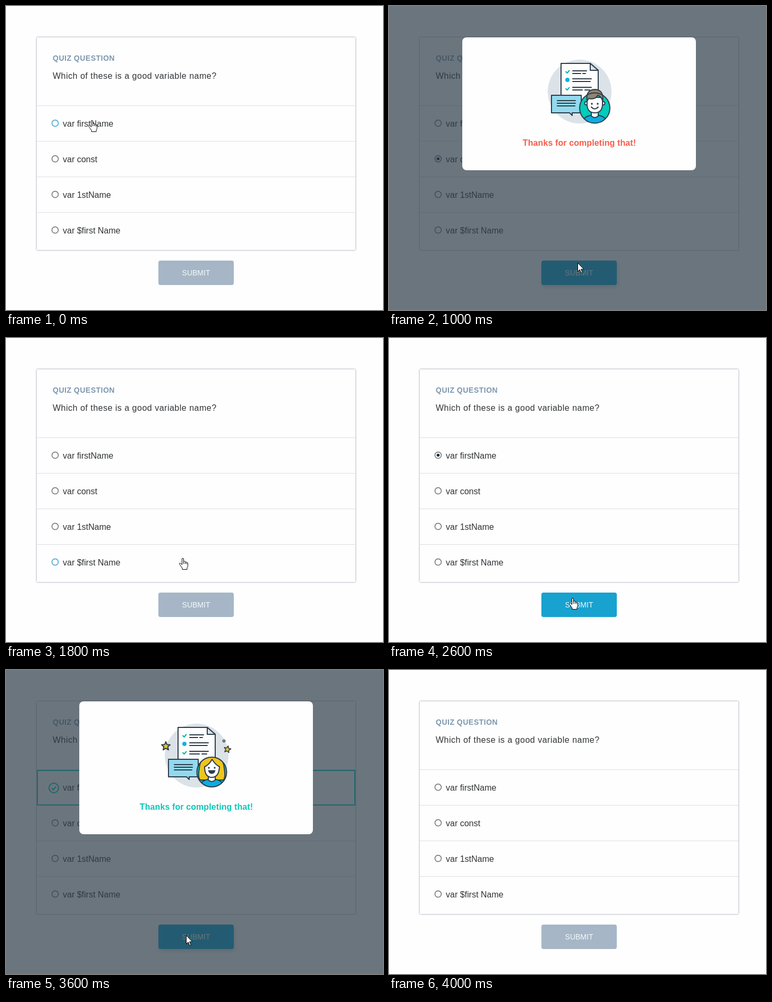
An HTML page that plays this animation: 710 px wide and 572 px high, repeating every 5 s.

```html
<!DOCTYPE html>
<html lang="en">
<head>
<meta charset="utf-8">
<title>Quiz</title>
<style>
  html, body { margin: 0; width: 100%; height: 100%; overflow: hidden; background: #fefefe; }
  svg { display: block; }
  text { font: 16px "Liberation Sans", Arial, sans-serif; fill: #303336; }
  .bold { font-weight: bold; }
  .kicker { font-weight: bold; font-size: 14px; letter-spacing: .5px; fill: #7d97ad; }
  .question { letter-spacing: .5px; }
  .submit { font-size: 14px; fill: #f6fafc; text-anchor: middle; }
  .thanks { font-weight: bold; letter-spacing: .1px; text-anchor: middle; }
  .ring { fill: #fefefe; stroke-width: 1.5; }
  .ink { stroke: #2e3d49; stroke-width: 2; stroke-linejoin: round; stroke-linecap: round; }
  .none { fill: none; }
  .card { filter: drop-shadow(0 0 1.5px rgba(52, 62, 96, .65)); }
</style>
</head>
<body>
<svg width="710" height="572" viewBox="0 0 710 572">
  <defs>
    <clipPath id="disc"><circle cx="387.5" cy="192" r="28"/></clipPath>
    <path id="star" d="M0-8 2.2-2.7 8-2.3 3.6 1.5 5 7.3 0 4.2-5 7.3-3.6 1.5-8-2.3-2.2-2.7Z"/>
  </defs>

  <rect width="710" height="572" fill="#fefefe"/>
  <rect class="card" x="58" y="59" width="600" height="400" fill="#fefefe"/>
  <text class="kicker" x="88" y="103">QUIZ QUESTION</text>
  <text class="question" x="88" y="137">Which of these is a good variable name?</text>
  <g id="rows"></g>

  <g id="right" fill="none" stroke="#02ccba" stroke-width="2">
    <rect x="59" y="189" width="598" height="65"/>
    <circle cx="90" cy="222" r="9" fill="#fefefe"/>
    <path d="M86 222.5l3 3 5-6"/>
  </g>

  <rect id="shade" x="287" y="479" width="142" height="46" rx="4" fill="#2e3d49"/>
  <rect id="button" x="287" y="479" width="142" height="46" rx="4"/>
  <text class="submit" x="358" y="507">SUBMIT</text>

  <g id="modal">
    <rect width="710" height="572" fill="#2e3d49" opacity=".7"/>
    <rect x="138" y="59" width="440" height="250" rx="8" fill="#fefefe"/>
    <circle cx="359" cy="161" r="60" fill="#dbe2e8"/>
    <path class="ink" fill="#fefefe" d="M324 108H379L394 121V190H324Z"/>
    <path class="ink" fill="#dbe2e8" d="M379 108V121H394Z"/>
    <path class="ink none" d="M346 122H372M346 127H361M365 127H370M346 137H381M346 142H379M346 153H381M346 158H364M369 158H378"/>
    <path fill="none" stroke="#02b3a4" stroke-width="2" d="M332.500 123l3 3 4.500-5M332.500 155l3 3 4.500-5"/>
    <circle cx="336" cy="139" r="4" fill="#12b2dc"/>
    <path class="ink" fill="#92d9f0" d="M306 168H362V201H345V206L340 201H306Z"/>
    <path class="ink none" d="M317 178H351M317 183H351M317 188H350"/>

    <g id="boy">
      <circle cx="387.500" cy="192" r="28.500" fill="#02ccba"/>
      <g clip-path="url(#disc)">
        <ellipse class="ink" cx="387.500" cy="218" rx="23" ry="13" fill="#0aaee0"/>
        <path class="ink" fill="#fefefe" d="M381 198V207Q387.500 213 394 207V198Z"/>
      </g>
      <circle class="ink" cx="371.500" cy="183" r="3" fill="#fefefe"/>
      <circle class="ink" cx="403.500" cy="183" r="3" fill="#fefefe"/>
      <path class="ink" fill="#fefefe" d="M373 172V186Q374 201 387.500 201T402 186V172Z"/>
      <path class="ink" fill="#918570" d="M373 179Q370 158 387 157Q405 157 402.500 179Q400 170 393 168Q388 177 376 174Z"/>
      <circle class="ink none" cx="387.500" cy="192" r="28.500"/>
      <circle cx="382" cy="184" r="1.800" fill="#2e3d49"/>
      <circle cx="393" cy="184" r="1.800" fill="#2e3d49"/>
      <path class="ink none" d="M381 190Q387.500 197 394 190"/>
    </g>

    <g id="girl">
      <circle cx="387.500" cy="192" r="28" fill="#02ccba"/>
      <g clip-path="url(#disc)">
        <path class="ink" fill="#efc51c" d="M366 207Q361 203 364 185Q366 161 387.500 161T411 185Q414 203 409 207Z"/>
        <ellipse class="ink" cx="387.500" cy="218" rx="22" ry="13" fill="#0aaee0"/>
        <path class="ink" fill="#fefefe" d="M381 198V207Q387.500 213 394 207V198Z"/>
      </g>
      <path class="ink" fill="#fefefe" d="M374 182Q374 202 387.500 202T402 182Q394 178 388 168Q383 178 374 182Z"/>
      <circle class="ink none" cx="387.500" cy="192" r="28"/>
      <circle cx="382" cy="184" r="1.700" fill="#2e3d49"/>
      <circle cx="393" cy="184" r="1.700" fill="#2e3d49"/>
      <path fill="#2e3d49" d="M380.500 188.500H394.500Q393 195.500 387.500 195.500T380.500 188.500Z"/>
      <g class="ink" fill="#efc51c">
        <use href="#star" x="301" y="143"/>
        <use href="#star" transform="translate(417 149) rotate(12) scale(.8)"/>
      </g>
      <circle cx="410.500" cy="133.500" r="2" fill="none" stroke="#2e3d49" stroke-width="1.500"/>
    </g>
    <text class="thanks" id="thanks" x="358.500" y="263">Thanks for completing that!</text>
  </g>

  <g id="hand" fill="#fff" stroke="#000" stroke-linejoin="round">
    <path d="M5.500 12.500V2Q5.500.5 7 .5T8.500 2V6.800Q9.300 5.500 10.800 6.200 11.500 6.600 11.500 7.400 12.600 6.600 13.600 7.300 14.200 7.800 14.200 8.600 16.500 8.200 16.500 10.500V14.500Q16.500 16 15 18.500V21.500H6V19Q4.500 17 3 14.800 1.500 12.500.6 11.200.3 9.700 1.600 9.500 3 9.500 5.500 12.500Z"/>
    <path fill="none" d="M8.500 6.500V11M11.500 7.400V11M14.200 8.600V11.500"/>
  </g>
  <path id="arrow" fill="#fff" stroke="#000" d="M.5.5V16.500L4.200 13 6.800 19.500 9.200 18.500 6.600 12.200H11.800Z"/>
</svg>

<script>
const LOOP = 5000;
const $ = id => document.getElementById(id);
const show = (el, on) => { el.style.display = on ? "" : "none"; };

const answers = ["var firstName", "var const", "var 1stName", "var $first Name"];
$("rows").innerHTML = answers.map((label, i) => {
  const y = 187 + 67 * i;
  return `<rect x="58" y="${y}" width="600" height="1" fill="#dcdee1"/>
    <g class="radio"><circle class="ring" cx="92.5" cy="${y + 33.5}" r="6"/>
    <circle class="dot" cx="92.5" cy="${y + 33.5}" r="2.8" fill="#1d2a38"/></g>
    <text x="107" y="${y + 40}">${label}</text>`;
}).join("");
const radios = [...document.querySelectorAll(".radio")];

// Button looks: fill, shadow dx, dy, blur, opacity
const looks = {
  off: ["#a6b6c6", 0, 0, 0, 0],
  waking: ["#68b5d5", 3, 4, 4, .06],
  rising: ["#38b4da", 6, 8, 8, .1],
  on: ["#09b4e3", 8, 10, 10, .15],
  dimming: ["#18a2cf", 2, 3, 3, .03],
  hover: ["#0ba7d3", 2, 4, 4, .2]
};

// Time, cursor, x, y, hovered row, chosen row, button look, result
const steps = [
  [0, "hand", 155, 215, 0, -1, "off", ""],
  [200, "hand", 160, 268, 1, -1, "off", ""],
  [400, "hand", 164, 284, 1, -1, "off", ""],
  [600, "hand", 172, 288, -1, 1, "rising", ""],
  [800, "hand", 350, 479, -1, 1, "on", ""],
  [1000, "arrow", 355, 483, -1, 1, "hover", "boy"],
  [1200, "arrow", 356, 487, -1, 1, "hover", "boy"],
  [1600, "arrow", 352, 491, -1, 1, "hover", "boy"],
  [1800, "hand", 326, 414, 3, -1, "off", ""],
  [2000, "hand", 354, 340, 2, -1, "off", ""],
  [2200, "hand", 318, 228, 0, -1, "off", ""],
  [2400, "hand", 314, 232, -1, 0, "waking", ""],
  [2600, "hand", 339, 489, -1, 0, "dimming", ""],
  [2800, "arrow", 344, 490, -1, 0, "hover", "girl"],
  [3000, "arrow", 343, 493, -1, 0, "hover", "girl"],
  [3200, "arrow", 342, 496, -1, 0, "hover", "girl"],
  [3400, "arrow", 341, 498, -1, 0, "hover", "girl"],
  [3600, "arrow", 339, 499, -1, 0, "hover", "girl"],
  [3800, "", 0, 0, -1, -1, "off", ""]
];

function draw(step) {
  const [, cursor, x, y, hovered, chosen, look, result] = step;
  for (const id of ["hand", "arrow"]) {
    show($(id), id === cursor);
    $(id).setAttribute("transform", `translate(${x} ${y})`);
  }

  radios.forEach((radio, i) => {
    const color = i === hovered ? "#3a9dce" : i === chosen && chosen === 1 ? "#566b80" : "#6c6f72";
    radio.firstElementChild.setAttribute("stroke", color);
    show(radio.querySelector(".dot"), i === chosen);
    show(radio, !(result === "girl" && i === 0));
  });

  const [fill, dx, dy, blur, alpha] = looks[look];
  $("button").setAttribute("fill", fill);
  $("shade").style.cssText = `transform:translate(${dx}px,${dy}px);filter:blur(${blur}px);opacity:${alpha}`;

  show($("modal"), result);
  show($("right"), result === "girl");
  show($("boy"), result === "boy");
  show($("girl"), result === "girl");
  $("thanks").style.fill = result === "girl" ? "#0cc8b8" : "#f95c4a";
}

const start = performance.now();
let current;
function tick() {
  const time = (performance.now() - start) % LOOP;
  const step = steps.findLast(s => s[0] <= time);
  if (step !== current) draw(current = step);
  requestAnimationFrame(tick);
}
tick();
</script>
</body>
</html>
```
